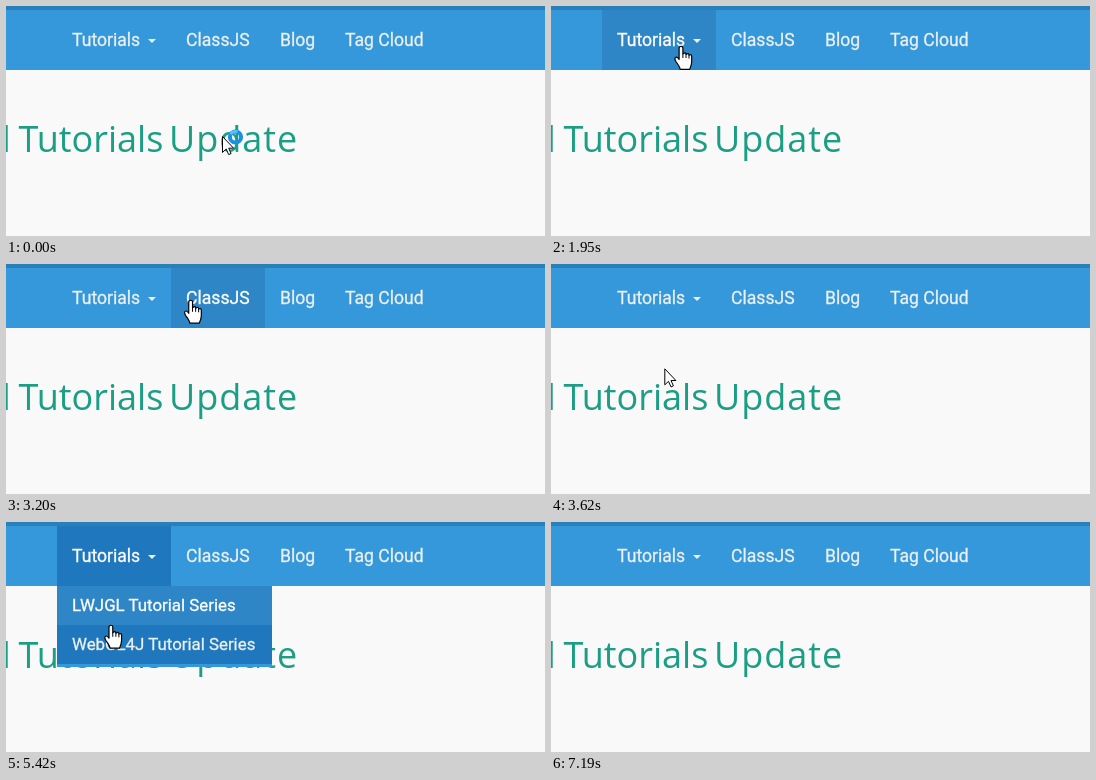
Animation of 539x230 px, one loop 8080 ms. Source, as an HTML page:

```html
<!DOCTYPE html>
<html lang="en">
<head>
<meta charset="utf-8">
<title>Navigation menu</title>
<style>
  html, body { margin: 0; width: 100%; height: 100%; overflow: hidden; background: #f9f9f9; }
  svg { display: block; width: 539px; height: 230px; }
  text { font-family: Roboto, sans-serif; fill: #ecf0f1; stroke: #ecf0f1; stroke-width: .3; }
  .nav text { font-size: 17.6px; }
  .menu text { font-size: 16.85px; }
  .nav rect { fill: none; }
  .menu rect { fill: #1f78bd; }
  .nav .hover rect, .menu .hover rect { fill: #2e86c6; }
  .nav .open rect { fill: #1f78bd; }
  .hover text, .open text { fill: #fff; stroke: #fff; }
  .caret { fill: #ecf0f1; }
  .title text { font: 36px "Open Sans", sans-serif; fill: #1b9e83; stroke: none; }
  .outline { fill: #fff; stroke: #000; stroke-linejoin: round; }
</style>
</head>
<body>
<svg viewBox="0 0 539 230">
  <rect width="539" height="230" fill="#f9f9f9"/>
  <g class="title">
    <text x="4.8" y="146" text-anchor="end">d</text>
    <text x="12.6" y="146">Tutorials</text>
    <text x="163" y="146" letter-spacing="1">Update</text>
  </g>
  <rect width="539" height="64" fill="#3498db"/>
  <rect width="539" height="4" fill="#2980b9"/>
  <g class="nav" id="nav"></g>
  <g class="menu" id="menu">
    <rect x="51" y="142" width="215" height="3" style="fill:#3498db"/>
  </g>
  <g id="cursor">
    <g id="arrow">
      <path class="outline" d="M.5 .5V16.5L4.2 13 6.7 18.6 9.1 17.5 6.7 12.2H11.6Z"/>
      <g id="busy" fill="none">
        <circle cx="13.5" cy="1" r="5.6" stroke="#1b8fe6" stroke-width="4"/>
        <path d="M8.6 -1.8A5.6 5.6 0 0 1 15.5 -4.2" stroke="#5cc0f5" stroke-width="3"/>
      </g>
    </g>
    <path id="beam" fill="none" stroke="#222" d="M-2 -7.5H4M1 -7V8M-2 8.5H4"/>
    <g id="hand">
      <path class="outline" stroke-width="1.2" d="M-1.9 13.5V2.3C-1.9 -.2 1.9 -.2 1.9 2.3V8Q5 5.5 5 8.4Q8 6.5 8 9.3Q10.7 7.8 10.7 10.6V15.8Q10.7 19 8.6 23.4H-.8Q-1.2 20.6 -4.8 16C-6.6 13.2 -6.3 11.5 -4.8 11.2Q-3.3 11 -1.9 13.5Z"/>
      <path d="M1.9 8V12M5 8.4V12M8 9.3V12.5" stroke="#000" fill="none"/>
    </g>
  </g>
</svg>
<script>
const LOOP = 8080, BUSY_END = 690, OPEN = 4190, CLOSE = 6740;
const $ = id => document.getElementById(id);
const point = (x, y) => ({ x, y });

const title = point(216, 130), tutorials = point(130, 40), tagCloud = point(378, 22);
const back = point(118, 38), below = point(113, 106.5), toggle = point(115.5, 45);
const first = point(109, 78), second = point(104.5, 113);
const outside = point(134, 168), gone = point(250, 236);

const go = (from, to, spot) => ({ from, to, spot });
const moves = [
  go(1170, 1950, tutorials), go(2540, 2900, tagCloud), go(2900, 3350, back),
  go(3515, 3640, below), go(3700, 3910, toggle),
  go(4465, 4820, first), go(4935, 5150, second), go(5395, 5540, first),
  go(5765, 5950, second), go(6225, 6420, outside), go(7045, 7190, gone)
];

// Each move eases in and out; the vertical part leads, which bends the path
function pointer(t) {
  let { x, y } = title;
  for (const { from, to, spot } of moves) {
    if (t < from) break;
    const u = Math.min(1, (t - from) / (to - from));
    const ease = u * u * (3 - 2 * u);
    x += (spot.x - x) * ease;
    y += (spot.y - y) * Math.sqrt(ease);
  }
  return point(x, y);
}

function add(parent, tag, attrs, text = '') {
  const el = document.createElementNS('http://www.w3.org/2000/svg', tag);
  for (const k in attrs) el.setAttribute(k, attrs[k]);
  el.textContent = text;
  return parent.appendChild(el);
}

function makeItem(parent, label, x, y, width, height, base) {
  const g = add(parent, 'g', {});
  add(g, 'rect', { x, y, width, height });
  add(g, 'text', { x: x + 15, y: base }, label);
  const hit = p => p.x >= x && p.x < x + width && p.y >= y && p.y < y + height;
  return { g, hit };
}

let left = 51;
const links = Object.entries({ Tutorials: 114, ClassJS: 94, Blog: 65, 'Tag Cloud': 109 })
  .map(([label, width]) => {
    const item = makeItem($('nav'), label, left, 4, width, 60, 40);
    left += width;
    return item;
  });
const entries = ['LWJGL Tutorial Series', 'WebGL4J Tutorial Series']
  .map((label, i) => makeItem($('menu'), label, 51, 64 + 39 * i, 215, 39, 89 + 39 * i));
add(links[0].g, 'path', { class: 'caret', d: 'M142 33H150L146 37Z' });

const show = (el, on) => el.setAttribute('visibility', on ? 'visible' : 'hidden');

function draw(t) {
  const p = pointer(t);
  const open = t >= OPEN && t < CLOSE, busy = t < BUSY_END;
  const hovered = [...links, ...(open ? entries : [])].find(item => item.hit(p));
  for (const item of [...links, ...entries]) {
    const state = open && item === links[0] ? 'open' : item === hovered ? 'hover' : '';
    item.g.setAttribute('class', state);
  }
  show($('menu'), open);

  const onText = !busy && !hovered && !open && p.y > 114 && p.y < 152;
  show($('hand'), hovered);
  show($('beam'), onText);
  show($('arrow'), !hovered && !onText);
  show($('busy'), busy);
  $('cursor').setAttribute('transform', `translate(${p.x.toFixed(2)} ${p.y.toFixed(2)})`);
}

const start = performance.now();
function tick() {
  draw((performance.now() - start) % LOOP);
  requestAnimationFrame(tick);
}
tick();
</script>
</body>
</html>
```
